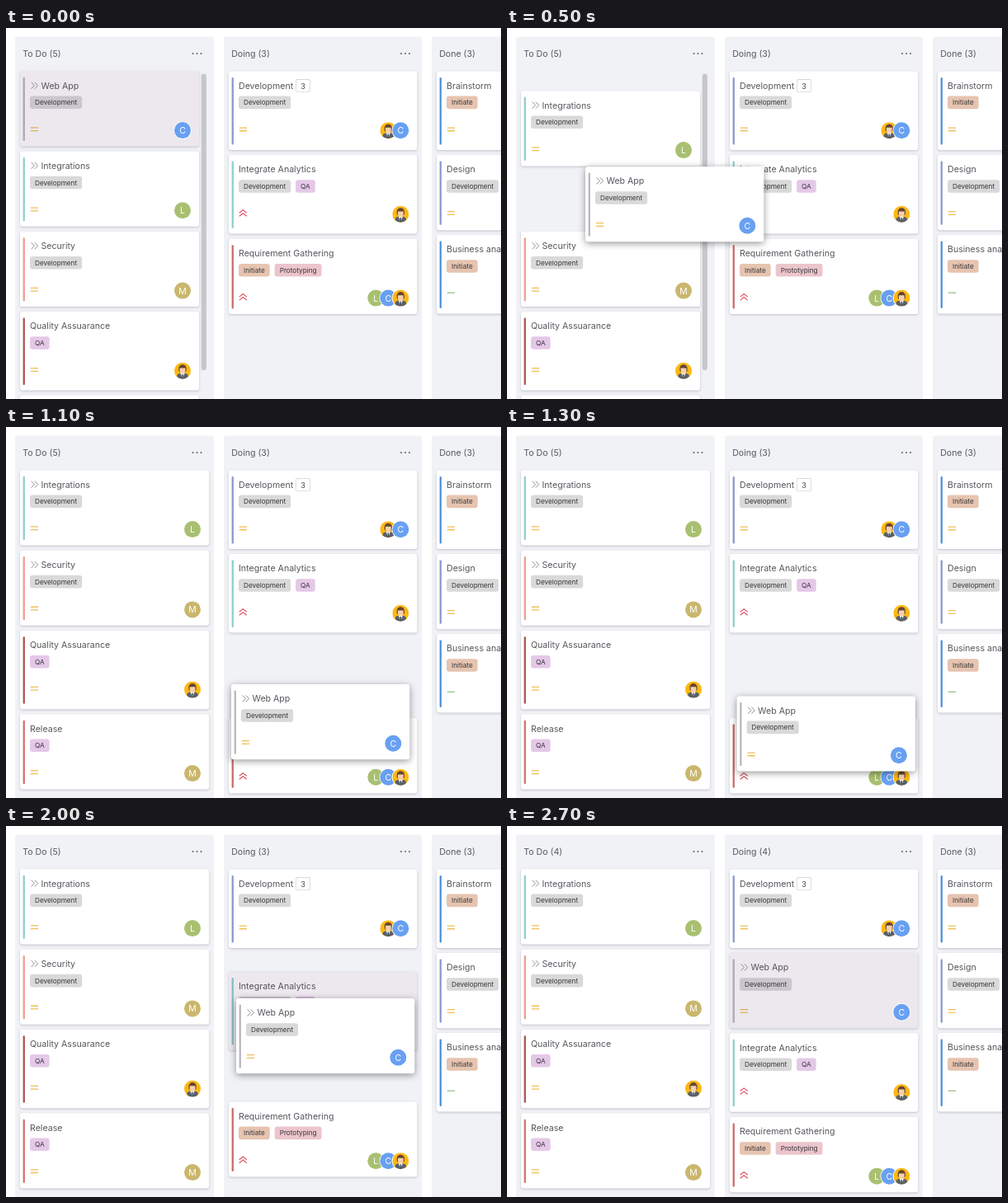
Recreate the animation shown at these times as an HTML page with a canvas. Size 600 by 450 pixels, loop 2800 ms.

```html
<!DOCTYPE html>
<html lang="en">
<head>
<meta charset="utf-8">
<title>Kanban board</title>
<style>
  html, body { margin: 0; width: 100%; height: 100%; overflow: hidden; background: #fff; }
  canvas { display: block; width: 600px; height: 450px; }
</style>
</head>
<body>
<canvas id="board"></canvas>
<script>
const W = 600, H = 450, LOOP = 2800, STEP = 100;
const canvas = document.getElementById('board');
const ctx = canvas.getContext('2d');
const ratio = window.devicePixelRatio || 1;
canvas.width = W * ratio;
canvas.height = H * ratio;

const FONT = 'Inter, "Open Sans", sans-serif';
const TAGS = { Development: '#d9d9da', QA: '#e5c8e8', Initiate: '#e6c4b0', Prototyping: '#ecc5cc' };
const AVATARS = { C: '#68a0f2', L: '#a8c070', M: '#cab76d' };
const SHORT = 91.2, TALL = 95.5;

const card = (title, bar, tags, people, priority = 'medium', h = SHORT, extra = {}) =>
  ({ title, bar, tags, people, priority, h, ...extra });

const sub = { nested: true };
const web = card('Web App', '#bab7be', ['Development'], 'C', 'medium', SHORT, sub);
const integrations = card('Integrations', '#8fcfc9', ['Development'], 'L', 'medium', SHORT, sub);
const security = card('Security', '#f09c92', ['Development'], 'M', 'medium', SHORT, sub);
const quality = card('Quality Assuarance', '#ad5552', ['QA'], 'P', 'medium', TALL);
const release = card('Release', '#d4726c', ['QA'], 'M');
const development = card('Development', '#8a9bce', ['Development'], 'PC', 'medium', TALL, { badge: '3' });
const analytics = card('Integrate Analytics', '#8ecfcf', ['Development', 'QA'], 'P', 'high', TALL);
const gathering = card('Requirement Gathering', '#cb6b6b', ['Initiate', 'Prototyping'], 'LCP', 'high');
const brainstorm = card('Brainstorm', '#4f91da', ['Initiate'], '', 'medium', TALL);
const design = card('Design', '#8a9bce', ['Development'], '');
const business = card('Business analysis', '#4f91da', ['Initiate'], '', 'low', TALL);

// Pointer path of the dragged card: time, left, top
const PATH = [
  [0, 17, 52.3], [100, 22, 62], [500, 95, 168], [1100, 273, 312], [1350, 280, 330],
  [1600, 282, 325], [2000, 279, 209], [2400, 273, 163], [2600, 270, 154]
];

function dragPosition(t) {
  const i = Math.max(1, PATH.findIndex(p => p[0] >= t));
  const [t0, x0, y0] = PATH[i - 1], [t1, x1, y1] = PATH[i];
  const k = (t - t0) / (t1 - t0);
  return [x0 + (x1 - x0) * k, y0 + (y1 - y0) * k];
}

// Eased progress of a card sliding to its new slot
function slide(t, start, duration = 250) {
  const p = Math.min(1, Math.max(0, (t - start) / duration));
  return p * p * (3 - 2 * p);
}

function box(x, y, w, h, r, fill) {
  ctx.beginPath();
  ctx.roundRect(x, y, w, h, r);
  ctx.fillStyle = fill;
  ctx.fill();
}

function disc(x, y, r, fill) {
  ctx.beginPath();
  ctx.arc(x, y, r, 0, Math.PI * 2);
  ctx.fillStyle = fill;
  ctx.fill();
}

function shape(points, fill) {
  ctx.beginPath();
  points.forEach(([x, y]) => ctx.lineTo(x, y));
  ctx.fillStyle = fill;
  ctx.fill();
}

function stroke(points, color, width) {
  ctx.beginPath();
  points.forEach(([x, y]) => ctx.lineTo(x, y));
  ctx.strokeStyle = color;
  ctx.lineWidth = width;
  ctx.stroke();
}

function label(text, x, y, size, color, align = 'left') {
  ctx.font = `${size}px ${FONT}`;
  ctx.textAlign = align;
  ctx.fillStyle = color;
  ctx.fillText(text, x, y);
}

function person(x, y) {
  ctx.save();
  ctx.beginPath();
  ctx.arc(x, y, 10, 0, Math.PI * 2);
  ctx.clip();
  ctx.translate(x, y);
  box(-10, -10, 20, 20, 0, '#fcb813');
  box(-4.6, -7.5, 9.2, 9, [4.5, 4.5, 2, 2], '#674630');
  box(-1.6, 0, 3.2, 5, 1, '#eebd97');
  box(-6.8, 3.2, 13.6, 8, [4, 4, 0, 0], '#58606b');
  shape([[-2.6, 3], [2.6, 3], [0, 9]], '#fff');
  shape([[-0.8, 4.2], [0.8, 4.2], [0.6, 9], [-0.6, 9]], '#3f4650');
  box(-3.4, -4.6, 6.8, 7.6, [2, 2, 3.4, 3.4], '#f6cfad');
  box(-3.6, -5.6, 7.2, 2.2, 1, '#674630');
  ctx.restore();
}

function avatar(kind, x, y) {
  disc(x, y, 10.7, '#fff');
  if (kind === 'P') return person(x, y);
  disc(x, y, 10, AVATARS[kind]);
  label(kind, x, y + 3.9, 10.5, '#fff', 'center');
}

function priorityMark(kind, x, y) {
  if (kind === 'high') {
    for (const dy of [0, 4]) {
      stroke([[x, y + dy], [x + 4.5, y - 3.6 + dy], [x + 9, y + dy]], '#df5265', 1.2);
    }
  } else if (kind === 'medium') {
    box(x, y - 2.3, 9.4, 1.3, 0.5, '#f0bf57');
    box(x, y + 1.4, 9.4, 1.3, 0.5, '#f0bf57');
  } else {
    box(x, y - 0.7, 9.4, 1.5, 0.5, '#a3c89b');
  }
}

function drawCard(c, x, y, w, { tinted = false, lifted = false } = {}) {
  ctx.save();
  ctx.shadowColor = lifted ? 'rgba(0,0,0,.42)' : 'rgba(40,40,60,.24)';
  ctx.shadowBlur = (lifted ? 9 : 3) * ratio;
  ctx.shadowOffsetY = (lifted ? 2 : 1) * ratio;
  box(x, y, w, c.h, 3, '#fff');
  ctx.restore();

  box(x + 3.6, y + 7.5, 2.3, c.h - 14, 1, c.bar);
  let left = x + 12;
  if (c.nested) {
    for (const dx of [0, 4.2]) {
      stroke([[x + 13.6 + dx, y + 13.4], [x + 17.4 + dx, y + 17.4], [x + 13.6 + dx, y + 21.4]], '#85858b', 0.9);
    }
    left = x + 25.5;
  }
  label(c.title, left, y + 21.3, 10.6, '#55575d');
  if (c.badge) {
    box(x + 81, y + 9.7, 18, 16, 2, '#d8d8da');
    box(x + 81.8, y + 10.5, 16.4, 14.4, 1.5, '#fff');
    label(c.badge, x + 90, y + 21.2, 9, '#44464b', 'center');
  }

  left = x + 12;
  for (const tag of c.tags) {
    ctx.font = `8.2px ${FONT}`;
    const width = ctx.measureText(tag).width + 12;
    box(left, y + 30.2, width, 15.6, 3, TAGS[tag]);
    label(tag, left + 6, y + 41, 8.2, '#36363a');
    left += width + 6;
  }
  priorityMark(c.priority, x + 12.7, y + 70.3);
  if (tinted) box(x, y, w, c.h, 3, 'rgba(80,50,105,.11)');

  [...c.people].forEach((kind, i, all) =>
    avatar(kind, x + w - 20 - 15 * (all.length - 1 - i), y + 71.8));
}

function column(x, w, title, dots) {
  box(x, 10.5, w, 460, 3, '#f1f2f6');
  label(title, x + 9.2, 35, 10.6, '#55595f');
  if (dots) [-5, 0, 5].forEach(dx => disc(dots + dx, 31, 1, '#5f6269'));
}

function draw(t) {
  ctx.setTransform(ratio, 0, 0, ratio, 0, 0);
  ctx.fillStyle = '#fff';
  ctx.fillRect(0, 0, W, H);

  const dropped = t >= 2600;
  const dragging = t > 0 && !dropped;
  const overflow = t < 700;
  column(11, 241, `To Do (${dropped ? 4 : 5})`, 231.5);
  column(264, 240, `Doing (${dropped ? 4 : 3})`, 484);
  column(516, 100, 'Done (3)');

  const todoW = overflow ? 217 : 229;
  const leave = slide(t, 560) * 97.2;
  if (t === 0) drawCard(web, 17, 52.3, todoW, { tinted: true });
  drawCard(integrations, 17, 149.5 - 97.2 * slide(t, 331), todoW);
  drawCard(security, 17, 246.8 - leave, todoW);
  drawCard(quality, 17, 344 - leave, todoW);
  drawCard(release, 17, 445.5 - leave, todoW);
  if (overflow) box(236.7, 55.5, 6.2, 359.5, 3.1, '#c7c7ca');

  const doingX = 270, doingW = 228.3;
  const gap = slide(t, 750) - slide(t, 1350) + slide(t, 1820);
  drawCard(development, doingX, 52.4, doingW);
  drawCard(analytics, doingX, 154 + 97.2 * slide(t, 1922), doingW, { tinted: t >= 1900 && t < 2200 });
  drawCard(gathering, doingX, 255.8 + 97.2 * gap, doingW);
  if (dropped) drawCard(web, doingX, 154, doingW, { tinted: true });

  drawCard(brainstorm, 522, 52.4, doingW);
  drawCard(design, 522, 154, doingW);
  drawCard(business, 522, 251, doingW);

  if (dragging) drawCard(web, ...dragPosition(t), 216.3, { lifted: true });
}

const start = performance.now();
function tick() {
  const elapsed = (performance.now() - start) % LOOP;
  draw(Math.floor(elapsed / STEP) * STEP);
  requestAnimationFrame(tick);
}
tick();
</script>
</body>
</html>
```
